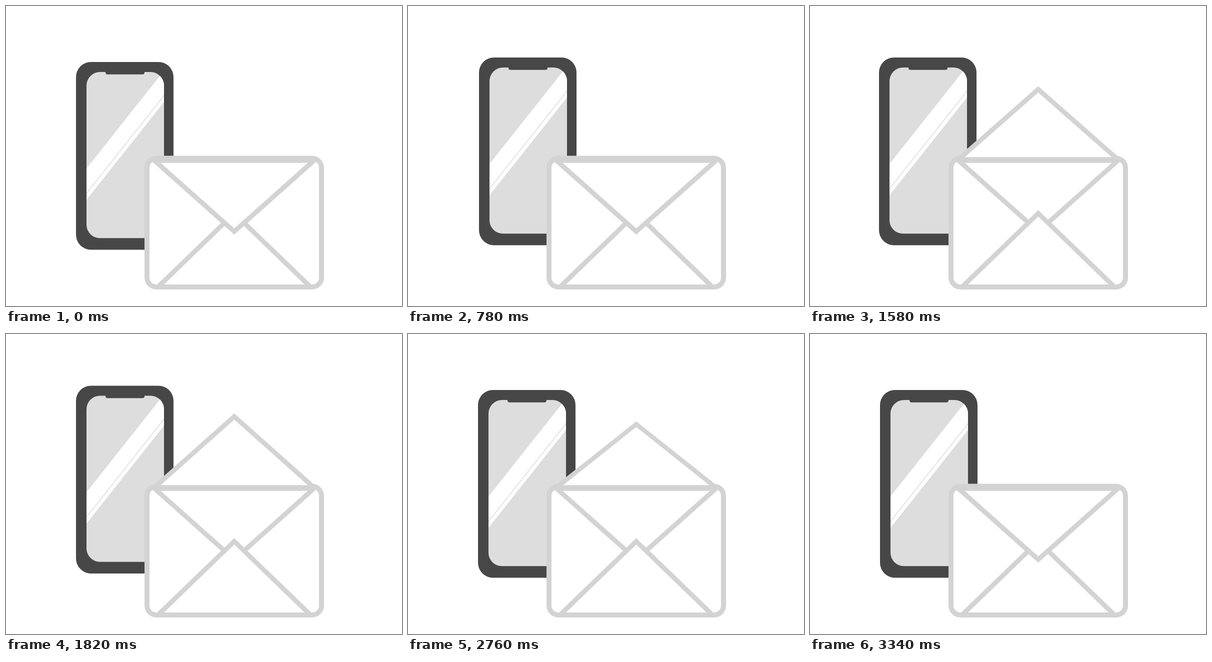
Write an HTML page with a canvas that moves like this. It is 792 px wide and 600 px high and loops after 3.36 s.

```html
<!DOCTYPE html>
<html lang="en">
<head>
<meta charset="utf-8">
<title>Phone and envelope</title>
<style>
html, body { margin: 0; width: 100%; height: 100%; overflow: hidden; background: #fff; }
canvas { display: block; }
</style>
</head>
<body>
<canvas id="stage" width="792" height="600"></canvas>
<script>
const ctx = document.getElementById('stage').getContext('2d');
const LOOP = 3360, TICK = 20;
const DARK = '#474747', SCREEN = '#dddddd', LINE = '#d3d3d3', WHITE = '#ffffff';
const HINGE_Y = 308, LEFT = 296, RIGHT = 617, MID = 456.5, FLAP = 143;

const progress = (t, from, to) => Math.min(1, Math.max(0, (t - from) / (to - from)));

// Cubic Bezier easing with flat ends; a and b are the handle lengths.
function ease(x, a, b) {
  let lo = 0, hi = 1;
  for (let i = 0; i < 30; i++) {
    const s = (lo + hi) / 2, r = 1 - s;
    if (3 * a * s * r * r + 3 * (1 - b) * s * s * r + s * s * s < x) lo = s;
    else hi = s;
  }
  return x <= 0 ? 0 : x >= 1 ? 1 : lo * lo * (3 - 2 * lo);
}

function phoneOffset(t) {
  const lift = progress(t, 0, 460) - progress(t, 1800, 2240);
  const shaking = t >= 460 && t < 1780;
  const x = shaking ? [0, -2, 2][Math.floor((t - 460) / 40) % 3] : 0;
  return [x, -9 * lift];
}

function flapScale(t) {
  const open = ease(progress(t, 1020, 1660), 0.6, 1);
  const close = ease(progress(t, 2555, 3237), 0.95, 0.95);
  return 1 - 2 * (open - close);
}

function roundRect(x, y, w, h, r) {
  ctx.beginPath();
  ctx.roundRect(x, y, w, h, r);
}

function path(...points) {
  ctx.beginPath();
  points.forEach(([x, y]) => ctx.lineTo(x, y));
}

function fill(color) {
  ctx.fillStyle = color;
  ctx.fill();
}

function stroke(width) {
  ctx.strokeStyle = LINE;
  ctx.lineWidth = width;
  ctx.stroke();
}

function glare(top, bottom) {
  const rise = 195.6;
  path([161, top], [316, top - rise], [316, bottom - rise], [161, bottom]);
  fill(WHITE);
}

function drawPhone(t) {
  ctx.save();
  ctx.translate(...phoneOffset(t));
  roundRect(140, 112, 195, 375.5, 30);
  fill(DARK);
  roundRect(161, 132, 155, 332.3, 27);
  fill(SCREEN);
  ctx.save();
  ctx.clip();
  glare(325, 373.5);
  glare(376, 387.5);
  ctx.restore();
  roundRect(199, 130, 78, 6.8, [0, 0, 4, 4]);
  fill(DARK);
  ctx.restore();
}

function fold(...points) {
  path(...points);
  fill(WHITE);
  stroke(9.4);
}

function drawEnvelope(t) {
  const flap = [[LEFT, 0], [MID, FLAP], [RIGHT, 0]];

  roundRect(282, 304.5, 349, 257.5, 19);
  fill(WHITE);

  ctx.save();
  ctx.translate(0, HINGE_Y);
  fold(...flap);
  ctx.restore();

  fold([306, 560], [MID, 414.7], [607, 560]);

  roundRect(282, 304.5, 349, 257.5, 19);
  stroke(10);

  ctx.save();
  ctx.translate(0, HINGE_Y);
  ctx.scale(1, flapScale(t));
  fold(...flap);
  ctx.restore();

  path([298, HINGE_Y], [615, HINGE_Y]);
  stroke(11.6);
}

function draw(t) {
  ctx.fillStyle = WHITE;
  ctx.fillRect(0, 0, 792, 600);
  drawPhone(t);
  drawEnvelope(t);
}

const start = performance.now();
function frame() {
  const elapsed = (performance.now() - start) % LOOP;
  draw(Math.floor(elapsed / TICK + 0.01) * TICK);
  requestAnimationFrame(frame);
}
frame();
</script>
</body>
</html>
```
